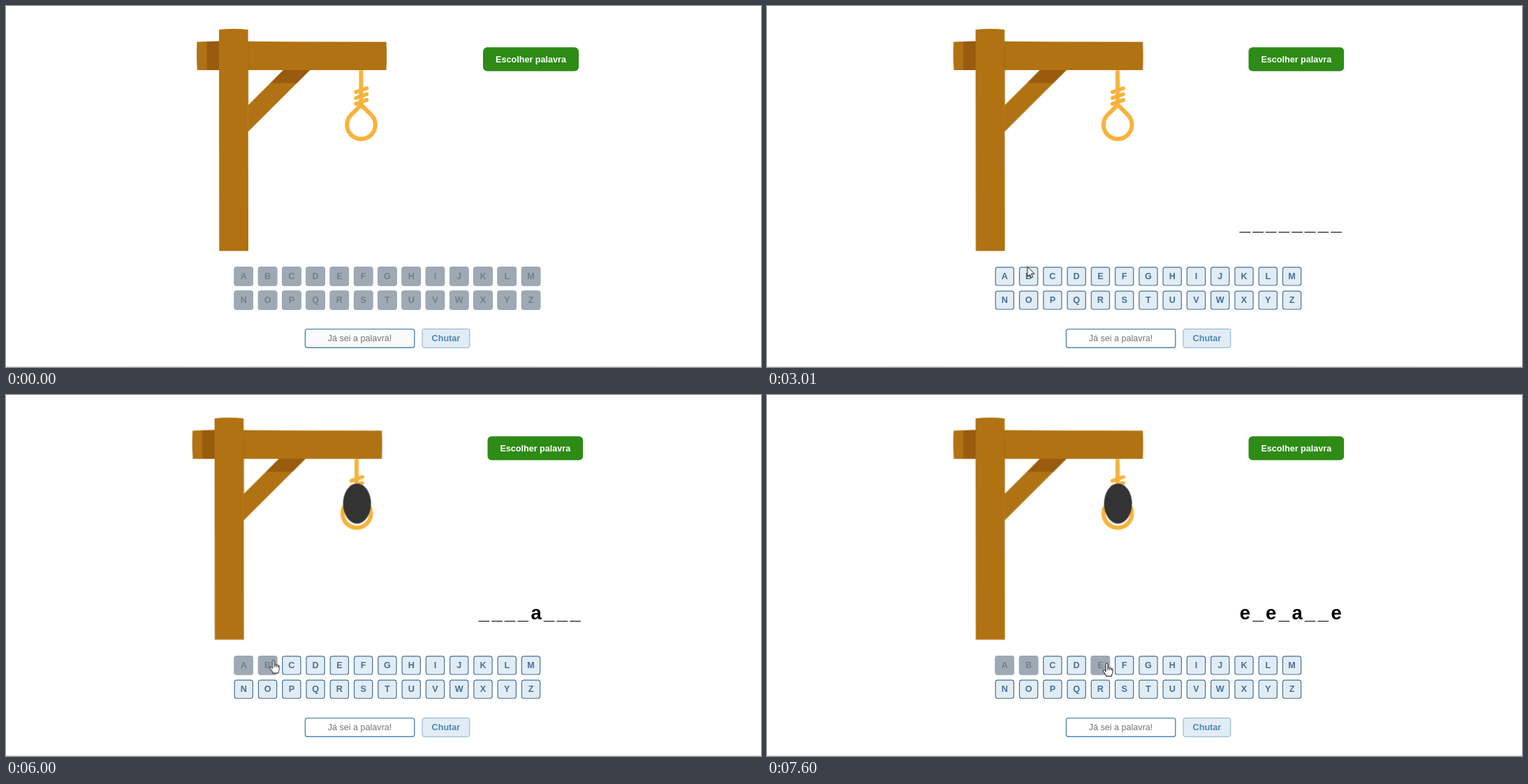
Animation of 1081x518 px, one loop 8 s. Source, as an HTML page:

```html
<!DOCTYPE html>
<html lang="pt-BR">
<head>
<meta charset="utf-8">
<title>Jogo da forca</title>
<style>
  html, body { margin: 0; width: 100%; height: 100%; overflow: hidden; background: #fff; }
  svg { display: block; width: 1081px; height: 518px; }
  text { font: bold 12.6px "Liberation Sans", Arial, sans-serif; text-anchor: middle; }

  .wood { fill: #b07212; }
  .shade { fill: #995b0d; }
  .rope { fill: none; stroke: #f7b239; stroke-width: 6; }
  .coils { stroke-width: 5.5; stroke-linecap: round; }
  .key rect { fill: #e1ecf4; stroke: #457199; stroke-width: 1.2; }
  .key text { fill: #457199; }
  .off rect { fill: #9fa9b4; }
  .off text { fill: #75808b; }
  .word { font-size: 27.4px; letter-spacing: 3.43px; text-anchor: start; }
  .hint { font-weight: normal; fill: #757575; }
  .pointer path { fill: #fff; stroke: #111; stroke-width: 1; stroke-linejoin: round; }

  .gallows, .choose, .field, .head, .off, .word, .arrow, .hand { animation: 8s step-end infinite; }
  .gallows { animation-name: gallows; }
  .choose { animation-name: choose; }
  .field { animation-name: field; }
  .head { animation-name: head; }
  .off { animation-name: locked; }
  .off.A { animation-name: usedA; }
  .off.B { animation-name: usedB; }
  .off.E { animation-name: usedE; }
  .w1 { animation-name: word1; }
  .w2 { animation-name: word2; }
  .w3 { animation-name: word3; }
  .arrow { animation-name: arrow; }
  .hand { animation-name: hand; }
  .pointer { animation: travel 8s linear infinite; }

  @keyframes gallows {
    0% { transform: none; }
    22.875% { transform: translate(-6.4px, 0); }
    71.625%, 100% { transform: translate(-6.4px, -.4px); }
  }
  @keyframes choose { 0% { transform: none; } 22.875%, 100% { transform: translate(6.3px, 0); } }
  @keyframes field { 0% { fill: #fafafa; } 22.875%, 100% { fill: #fff; } }
  @keyframes head { 0% { visibility: hidden; } 71.625%, 100% { visibility: visible; } }
  @keyframes locked { 0% { visibility: visible; } 22.875%, 100% { visibility: hidden; } }
  @keyframes usedA { 0%, 45.25%, 100% { visibility: visible; } 22.875% { visibility: hidden; } }
  @keyframes usedB { 0%, 71.625%, 100% { visibility: visible; } 22.875% { visibility: hidden; } }
  @keyframes usedE { 0%, 94.125%, 100% { visibility: visible; } 22.875% { visibility: hidden; } }
  @keyframes word1 { 0%, 45.25%, 100% { visibility: hidden; } 22.875% { visibility: visible; } }
  @keyframes word2 { 0%, 94.125%, 100% { visibility: hidden; } 45.25% { visibility: visible; } }
  @keyframes word3 { 0% { visibility: hidden; } 94.125%, 100% { visibility: visible; } }
  @keyframes arrow {
    0%, 16.125%, 38.5%, 100% { visibility: hidden; }
    7.375%, 25.375% { visibility: visible; }
  }
  @keyframes hand {
    0%, 25.375% { visibility: hidden; }
    16.125%, 38.5%, 100% { visibility: visible; }
  }
  @keyframes travel {
    0%, 7.375% { transform: translate(1017px, 506px); animation-timing-function: cubic-bezier(.3, .3, .5, 1); }
    17% { transform: translate(754px, 80px); }
    17.875%, 18.75%, 24.5% { transform: translate(754.5px, 77.5px); animation-timing-function: ease-in; }
    32.375% { transform: translate(610px, 320px); animation-timing-function: ease-out; }
    37.625% { transform: translate(373px, 374px); animation-timing-function: ease-out; }
    42%, 51% { transform: translate(342.5px, 378px); }
    52%, 55.25% { transform: translate(345px, 376px); }
    56.125% { transform: translate(355px, 376px); }
    58.75%, 60.375% { transform: translate(369px, 369px); animation-timing-function: ease-in-out; }
    63.875% { transform: translate(404px, 377px); animation-timing-function: ease-in-out; }
    67.375%, 74.125% { transform: translate(372.5px, 380px); }
    81.125% { transform: translate(458.5px, 384px); animation-timing-function: ease-out; }
    84.625% { transform: translate(561px, 382px); animation-timing-function: ease-in-out; }
    94.125%, 100% { transform: translate(487px, 385px); }
  }
</style>
</head>
<body>
<svg viewBox="0 0 1081 518">
  <g class="gallows">
    <path class="wood" d="M273.5 51.5Q280 50.8 305 50.7H347L410 51.2 544.5 51.6Q545.5 71 544.5 92H273.8Q272.4 71 273.5 51.5Z"/>
    <path class="shade" d="M287.5 51L305 50.6V92H287.5Z"/>
    <path class="wood" d="M397 92H435L347 180V142Z"/>
    <path class="shade" d="M397 92H435L416.5 110.5H379Z"/>
    <path class="wood" d="M305 34Q326 31.5 346.6 34L347 351.5H305.3Z"/>
    <path d="M346.8 51V180" stroke="#a4680f" stroke-width=".6"/>
    <path class="rope" d="M508.4 92.3V142"/>
    <path class="rope coils" d="M501 123.5L516.5 118M501 132L516.5 126.5M501 140.3L516.5 134.8"/>
    <path class="rope" d="M508.5 141.8L494.15 156.15A20.3 20.3 0 1 0 522.85 156.15Z"/>
    <ellipse class="head" cx="509" cy="156.2" rx="20" ry="28.8" fill="#333"/>
  </g>

  <g class="choose">
    <rect x="683" y="59.3" width="137" height="34.3" rx="6" fill="#2d8b16"/>
    <text x="751.5" y="80.5" fill="#fff">Escolher palavra</text>
  </g>

  <text class="word w1" x="676.8" y="321.5">________</text>
  <text class="word w2" x="676.8" y="321.5">____a___</text>
  <text class="word w3" x="676.8" y="321.5">e_e_a__e</text>

  <g id="keys"></g>

  <rect class="field" x="428.4" y="463.6" width="156.4" height="26.6" rx="3" stroke="#4d87b5" stroke-width="1.4"/>
  <text class="hint" x="506.5" y="481">Já sei a palavra!</text>
  <rect x="596" y="463.5" width="67.8" height="26.8" rx="3" fill="#e1ecf4" stroke="#7aa7c7" stroke-width=".9"/>
  <text x="629.9" y="481" fill="#5088b3">Chutar</text>
  <path d="M0 517.4H1081" stroke="#d6d6d6"/>

  <g class="pointer">
    <path class="arrow" d="M0 0V14.2L3.3 11.2 5.4 16 7.6 15 5.6 10.3H10Z"/>
    <g class="hand">
      <path d="M-2 12V1.4a1.5 1.5 0 0 1 3 0V6.5q2-1 2.8.4 2-.7 2.5.6 1.7-.3 1.7 1.5v3.5q0 2-1.3 3.5v2.5H-1.5V17L-5.6 11.5q-.6-2 1-2 1.5.3 2.6 2.5Z"/>
      <path d="M1 6.5V10M3.8 7V10M6.3 7.6V10"/>
    </g>
  </g>
</svg>
<script>
  const pitch = 34.27, size = 27.4;

  function key(letter, i) {
    const x = 326.6 + (i % 13) * pitch;
    const y = 374.2 + Math.floor(i / 13) * pitch;
    const face = (inset) =>
      `<rect x="${x + inset}" y="${y + inset}" width="${size - 2 * inset}" height="${size - 2 * inset}" rx="3"/>
       <text x="${x + size / 2}" y="${y + 18}">${letter}</text>`;
    return `<g class="key">${face(.6)}</g><g class="off ${letter}">${face(0)}</g>`;
  }

  document.getElementById('keys').innerHTML =
    [...'ABCDEFGHIJKLMNOPQRSTUVWXYZ'].map(key).join('');
</script>
</body>
</html>
```
